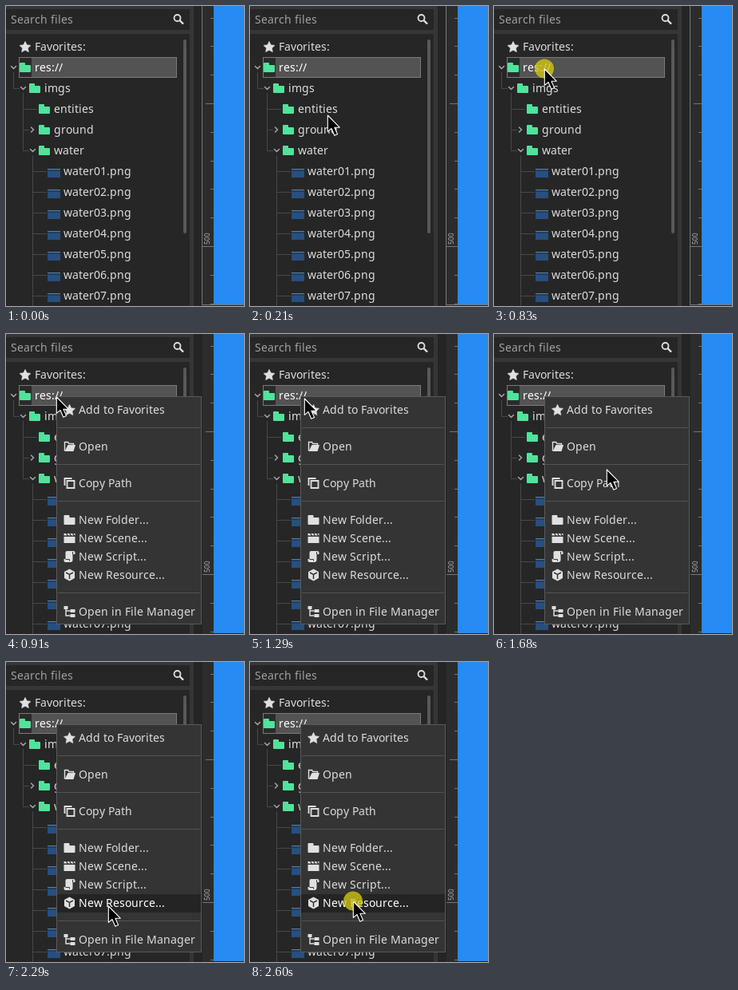
Write an HTML page that moves like this. It is 298 by 376 pixels and loops after 2680 ms.

```html
<!DOCTYPE html>
<html>
<head>
<meta charset="utf-8">
<style>
html, body { margin: 0; width: 100%; height: 100%; overflow: hidden; background: #363636; }
svg { display: block; }
text { font: 14px "Noto Sans", "Open Sans", sans-serif; fill: #dcdcdc; white-space: pre; }
.line { fill: none; stroke: #484848; }
.icon { fill: #e0e0e0; }
.outline { fill: none; stroke: #e0e0e0; stroke-width: 1.8; }
.arrow { fill: none; stroke: #a0a0a0; stroke-width: 1.6; stroke-linecap: round; stroke-linejoin: round; }
</style>
</head>
<body>
<svg id="stage" width="298" height="376" viewBox="0 0 298 376"></svg>
<script>
const LOOP = 2680, STEPS = 35, MENU_STEP = 12;
const ruler = document.createElement('canvas').getContext('2d');
ruler.font = '14px "Noto Sans", "Open Sans", sans-serif';

const rect = (x, y, w, h, fill, more = '') =>
  `<rect x="${x}" y="${y}" width="${w}" height="${h}" fill="${fill}" ${more}/>`;
const path = (d, cls, more = '') => `<path d="${d}" class="${cls}" ${more}/>`;
const at = (x, y, s) => `<g transform="translate(${x} ${y})">${s}</g>`;

// The interface snaps every glyph advance to whole pixels
function label(x, y, s, fill = '#dcdcdc') {
  const xs = [];
  for (const c of s) {
    xs.push(x);
    x += Math.round(ruler.measureText(c).width);
  }
  return `<text x="${xs.join(' ')}" y="${y + 5}" style="fill:${fill}">${s}</text>`;
}

// Icons are centred on 0,0
const folderShape = 'M-6-6h5q1 0 1 1v2h6q1 0 1 1v7q0 1-1 1H-6q-1 0-1-1V-5q0-1 1-1z';
const folder = path(folderShape, '', 'fill="#4fe39b"');
const star = path('M0-6.6L2.1-2.2 7-1.6 3.4 1.8 4.3 6.6 0 4.3-4.3 6.6-3.4 1.8-7-1.6-2.1-2.2z', 'icon',
  'stroke="#e0e0e0" stroke-width=".7" stroke-linejoin="round"');
const open = path('M-3 0l1-2h9.5L5 6H-6z', 'icon') +
  path('M-6 5.5V-5.5h4l1.5 2H5v2', 'outline', 'style="stroke-width:1.4"');
const copy = path('M-3-3H6V6H-3zM-6 3V-6H3', 'outline');
const clap = path('M-7-2H7V6H-7zM-7-6H7v2.6H-7z', 'icon') +
  path('M-4-6.5l2 3.5M0-6.5l2 3.5M4-6.5l2 3.5', '', 'stroke="#343434" stroke-width="1.3"');
const scroll = path('M-3-7H5q2 0 2 2v2H4V4q0 3-3 3H-5q-2 0-2-2V3h2V-5q0-2 2-2z', 'icon') +
  path('M4-6v3M-5 3.5h5v2', '', 'fill="none" stroke="#343434"');
const cube = path('M0-7.5L6.5-4V4L0 7.5-6.5 4V-4z', 'icon') +
  path('M-4.5-3L0-.7 4.5-3M0-.7V5', '', 'fill="none" stroke="#343434" stroke-width="1.5"');
const tree = path('M-7-7h5v4h-5zM1-3h6V1H1zM1 3h6v4H1z', 'icon') +
  path('M-4.5-3V5H1M-4.5-1H1', 'outline', 'style="stroke-width:1.4"');

const down = (x, y) => path(`M${x - 3} ${y - 1.5}l3 3 3-3`, 'arrow');

function dock() {
  let s = rect(0, 4, 230, 26, '#262626') + label(6, 17, 'Search files', '#a0a0a0') +
    '<circle cx="214.5" cy="15" r="4" class="outline"/>' +
    path('M217.5 18l4.5 4.5', 'outline', 'style="stroke-width:2.4"') +
    rect(0, 35, 230, 341, '#262626') + rect(222, 42, 4, 243, '#595959', 'rx="2"') +
    path('M9.5 83V103.5H17M21.5 109V181.5H29M21.5 129.5H39M21.5 155.5H29M33.5 187V376', 'line') +
    at(24, 51, star) + label(36, 51, 'Favorites:') +
    rect(16.5, 64.5, 197, 25, '#535353', 'stroke="#7a7a7a"') + rect(17, 65, 15, 24, '#2b2b2b');
  [['res://', 24, 36], ['imgs', 36, 48], ['entities', 48, 60], ['ground', 48, 60], ['water', 48, 60]]
    .forEach(([name, ix, tx], i) => {
      const y = 77 + 26 * i;
      s += at(ix, y, folder) + label(tx, y, name, i ? undefined : '#fff');
    });
  s += down(9.5, 77) + down(21.5, 103) + down(33.5, 181) + path('M31.5 152l3 3-3 3', 'arrow');
  for (let i = 1; i < 8; i++) {
    const y = 181 + 26 * i;
    s += path(`M33.5 ${y + .5}H51`, 'line') + rect(52, y - 3, 16, 11, '#274f7f') +
      rect(52, y - 3, 16, 1, '#5f7f96') + rect(52, y - 2, 16, 2, '#203f66') +
      label(72, y, `water0${i}.png`);
  }
  return s;
}

function viewport() {
  let s = rect(235, 0, 63, 376, '#252525') + rect(246, 0, 14, 376, '#2c2c2c') +
    rect(260, 0, 38, 375, '#268bf2');
  // Ruler: short ticks, every fifth one longer
  for (let i = 0; i < 11; i++) {
    const w = i == 8 ? 14 : i == 3 ? 10 : 4;
    s += rect(260 - w, Math.round(14.6 + 35.8 * i), w, 1, '#757575');
  }
  return s + '<text transform="translate(254.5 299) rotate(-90)" style="font-size:8.5px;fill:#aaa">500</text>';
}

const focusFrame = rect(245, 0, 1, 375, '#777') + rect(245, 374, 53, 1, '#777');

const items = [
  [95, 'Add to Favorites', star], [141, 'Open', open], [187, 'Copy Path', copy],
  [233, 'New Folder...', path(folderShape, 'icon')], [256, 'New Scene...', clap],
  [279, 'New Script...', scroll], [302, 'New Resource...', cube],
  [348, 'Open in File Manager', tree]
];

function menu(tipY) {
  let s = rect(63.5, 78.5, 181, 285, '#343434', 'stroke="#5a5a5a"');
  for (const y of [117, 163, 209, 324]) s += rect(65, y, 178, 1, '#545454');
  for (const [y, name, icon] of items) {
    const hot = Math.abs(tipY - y) < 11.5;
    if (hot) s += rect(64, y - 11, 180, 23, '#242424');
    s += at(79.5, y, icon) + label(91, y, name, hot ? '#fff' : undefined);
  }
  return s;
}

// Pointer waypoints: step, x, y
const route = [
  [1, 174, 276], [3, 98, 138], [5, 49, 57], [6, 46, 60], [8, 64, 80], [16, 64, 80],
  [17, 69, 82], [18, 98, 132], [20, 146, 279], [22, 142, 171], [24, 145, 318],
  [25, 144, 347], [27, 139, 326], [30, 129, 307], [32, 130, 301], [35, 130, 301]
];

function pointer(step) {
  const i = Math.max(1, route.findIndex(p => p[0] >= step));
  const [a, x, y] = route[i - 1], [b, u, v] = route[i], k = (step - a) / (b - a);
  return [x + (u - x) * k, y + (v - y) * k];
}

const scene = dock() + viewport();
const arrow = path('M-.7-1V19.4L4 15.5 7.8 24.2 11.6 22.6 7.9 14.2H14.2z', '',
  'fill="#000" stroke="#fff" stroke-width="1.1" stroke-linejoin="round"');
const stage = document.getElementById('stage');
let shown = -1;

function draw(now) {
  // Each pose is held for one step; 23 ms aligns the rounding
  const step = Math.min(STEPS - 1, Math.floor((now % LOOP + 23) * STEPS / LOOP));
  if (step == shown) return;
  shown = step;
  let s = scene;
  if (step < MENU_STEP) s += focusFrame;
  if (step) {
    const [x, y] = pointer(step);
    if (step >= MENU_STEP) s += menu(y);
    if (step >= 9 && step < MENU_STEP || step == 34)
      s += `<circle cx="${x - 1}" cy="${y - 1.5}" r="12" fill="#d2c414" fill-opacity=".8"/>`;
    s += at(x, y, arrow);
  }
  stage.innerHTML = s;
}

const start = performance.now();
function tick() {
  draw(performance.now() - start);
  requestAnimationFrame(tick);
}
tick();
</script>
</body>
</html>
```
